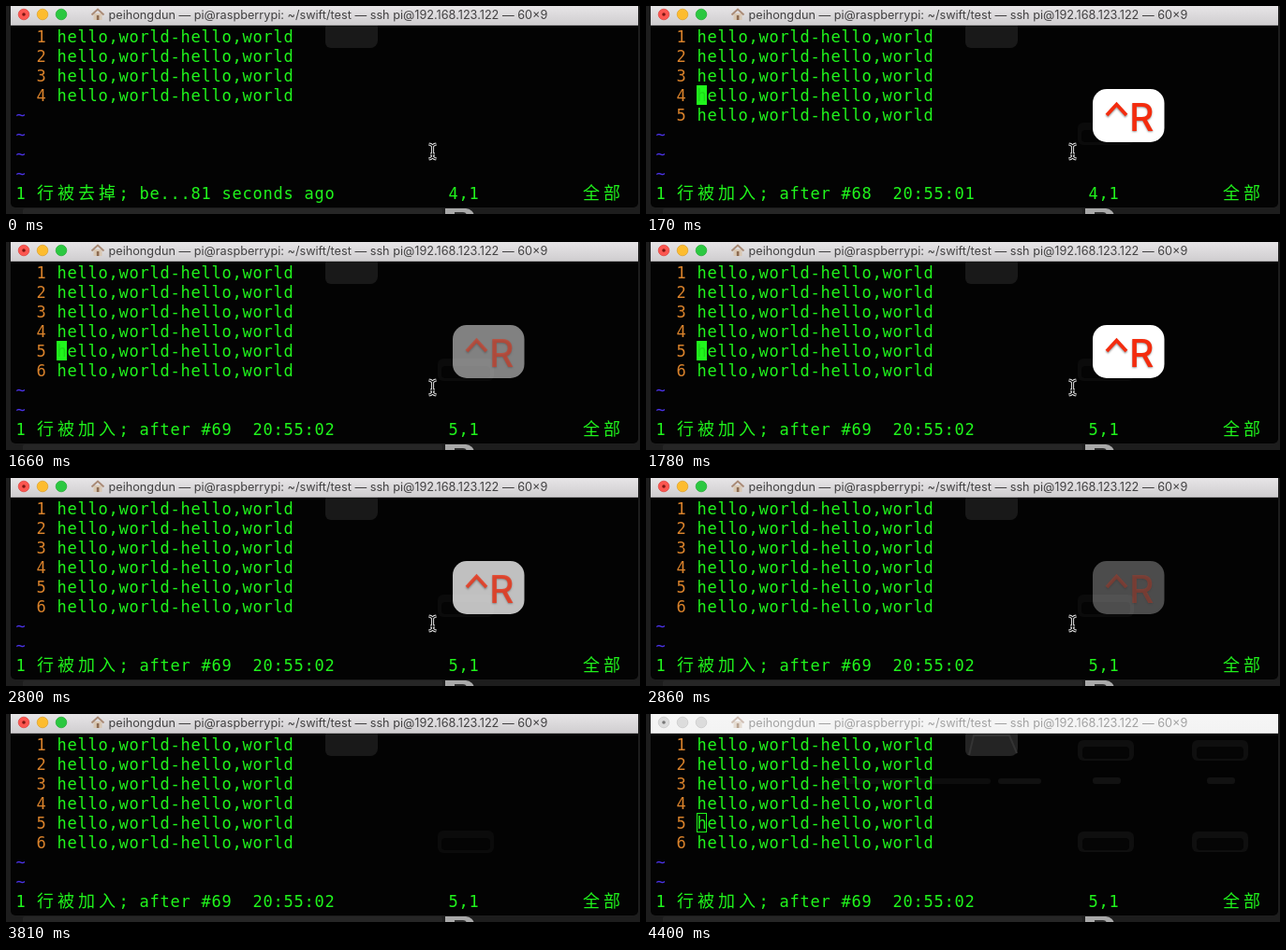
Recreate the animation shown at these times as an HTML page with a canvas. Size 677 by 223 pixels, loop 4.5 s.

```html
<!DOCTYPE html>
<html lang="zh">
<head>
<meta charset="utf-8">
<title>Terminal redo</title>
<style>
html, body { margin: 0; width: 100%; height: 100%; overflow: hidden; background: #1d1d1d; }
canvas { display: block; width: 677px; height: 223px; }
</style>
</head>
<body>
<canvas id="stage" width="677" height="223"></canvas>
<script>
const ctx = document.getElementById('stage').getContext('2d');
const LOOP = 4500;
const CELL = { x: 10, y: 22, w: 11, h: 21 };
const GREEN = '#20f51c', ORANGE = '#d9822b', BLUE = '#4a32e4';
const MONO = '17px "DejaVu Sans Mono", "Noto Sans Mono", monospace';
const CJK = '18px "Noto Sans CJK SC", "Noto Sans CJK", sans-serif';
const TITLE = 'peihongdun — pi@raspberrypi: ~/swift/test — ssh pi@192.168.123.122 — 60×9';

// Step tracks: [start time, value]
const EDITS = [
  [0, { lines: 4, status: '1 行被去掉; be...81 seconds ago', pos: '4,1' }],
  [60, { lines: 5, status: '1 行被加入; after #68  20:55:01', pos: '4,1' }],
  [1660, { lines: 6, status: '1 行被加入; after #69  20:55:02', pos: '5,1' }]
];
const KEY_ALPHA = [[0, 0], [60, .3], [115, .75], [170, 1], [1250, .29], [1310, 0],
  [1660, .5], [1780, 1], [2800, .75], [2860, .29], [2920, 0]];
const CURSOR = [[0, 'off'], [60, 'solid'], [2800, 'off'], [3280, 'solid'], [3810, 'off'], [4290, 'outline']];
const POINTER = [[0, [455.5, 156]], [3450, [497, 161]], [3510, [596, 175]], [3570, null]];

function at(track, t) {
  let value = track[0][1];
  for (const [start, v] of track) if (t >= start) value = v;
  return value;
}

function box(x, y, w, h, r, fill) {
  ctx.beginPath();
  ctx.roundRect(x, y, w, h, r);
  ctx.fillStyle = fill;
  ctx.fill();
}

function disc(x, y, r, fill, edge) {
  ctx.beginPath();
  ctx.arc(x, y, r, 0, Math.PI * 2);
  ctx.fillStyle = fill;
  ctx.fill();
  ctx.strokeStyle = edge;
  ctx.lineWidth = .7;
  ctx.stroke();
}

function path(points, color, width) {
  ctx.beginPath();
  points.forEach(([x, y]) => ctx.lineTo(x, y));
  ctx.strokeStyle = color;
  ctx.lineWidth = width;
  ctx.stroke();
}

// Terminal grid: wide characters take two cells
function print(text, col, row, color) {
  ctx.fillStyle = color;
  for (const ch of text) {
    const wide = ch > '\u2e80';
    ctx.font = wide ? CJK : MONO;
    ctx.fillText(ch, CELL.x + col * CELL.w + (wide ? 1 : .4), CELL.y + row * CELL.h + 17);
    col += wide ? 2 : 1;
  }
}

function drawDesktop() {
  ctx.fillStyle = '#1d1d1d';
  ctx.fillRect(0, 0, 677, 223);
  box(18, 217, 448, 8, 2, '#262626');
  box(469, 217, 31, 14, [0, 9, 0, 0], '#a9a9a9');
  box(479, 221, 13, 8, [0, 4, 0, 0], '#303030');
}

function drawGhosts(idle, t) {
  box(341, 15, 56, 30, [0, 0, 8, 6], idle ? '#242424' : '#191919');
  if (idle) {
    path([[345, 44], [350, 23], [388, 23], [396, 42]], '#343434', 2);
    box(200, 69, 168, 6, 3, '#0d0d0d');
    box(376, 69, 46, 6, 3, '#111');
    for (const x of [461, 583]) {
      for (const y of [28, 126]) {
        box(x, y, 60, 22, 6, '#0f0f0f');
        box(x + 5, y + 7, 50, 13, 4, '#050505');
      }
      box(x + 16, 68, 30, 7, 3, '#121212');
    }
  } else if (t >= 60) {
    box(461, 125, 60, 24, 6, '#0b0b0b');
    box(465, 133, 52, 13, 4, '#040404');
  }
}

function drawTitle(idle) {
  const fade = ctx.createLinearGradient(0, 0, 0, 20);
  fade.addColorStop(0, idle ? '#f6f6f6' : '#e7e5e7');
  fade.addColorStop(1, idle ? '#f3f3f3' : '#d0ced0');
  box(5, -4, 670, 24, 0, fade);
  ctx.fillStyle = idle ? '#cfcfcf' : '#aaa8aa';
  ctx.fillRect(5, 20, 670, 1);

  const lights = [['#fc5650', '#df3e3a'], ['#fdbc2f', '#dda024'], ['#2bc840', '#1eaa2e']];
  lights.forEach(([fill, edge], i) =>
    disc(19 + i * 20, 9, 5.8, idle ? '#dcdcdc' : fill, idle ? '#c8c8c8' : edge));
  disc(19, 9, 1.8, idle ? '#777' : '#7d1712', 'transparent');

  ctx.globalAlpha = idle ? .5 : 1;
  box(93.5, 8, 9, 7, 0, '#d9c8b4');
  box(96.8, 10, 2.6, 5, 0, '#8c6a50');
  path([[91.5, 9.5], [98, 3.5], [104.5, 9.5]], '#a98a76', 1.8);
  ctx.globalAlpha = 1;

  ctx.font = '12.7px Inter, Roboto, sans-serif';
  ctx.fillStyle = idle ? '#a2a2a2' : '#424142';
  ctx.fillText(TITLE, 109.5, 13.5);
}

function drawEditor({ lines, status, pos }, cursor) {
  for (let row = 0; row < 8; row++) {
    if (row < lines) {
      print(String(row + 1), 2, row, ORANGE);
      print('hello,world-hello,world', 4, row, GREEN);
    } else {
      print('~', 0, row, BLUE);
    }
  }
  print(status, 0, 8, GREEN);
  print(pos, 42, 8, GREEN);
  print('全部', 55, 8, GREEN);

  const row = parseInt(pos) - 1;
  const x = CELL.x + 4 * CELL.w, y = CELL.y + row * CELL.h;
  if (cursor === 'solid') {
    box(x, y, CELL.w, CELL.h, 0, GREEN);
    print('h', 4, row, 'rgba(0,60,0,.15)');
  } else if (cursor === 'outline') {
    ctx.strokeStyle = GREEN;
    ctx.lineWidth = 1;
    ctx.strokeRect(x + .5, y + .5, CELL.w - 1, CELL.h - 1);
  }
}

function drawKey(alpha) {
  if (!alpha) return;
  ctx.save();
  ctx.globalAlpha = alpha;
  box(477, 89, 76.5, 57, 15, '#fff');
  ctx.shadowColor = 'rgba(0,0,0,.4)';
  ctx.shadowBlur = 2;
  ctx.shadowOffsetY = 1.5;
  path([[492, 117], [502.5, 105.5], [513, 117]], '#f42c0e', 3.8);
  ctx.font = '500 41px Inter, Roboto, sans-serif';
  ctx.fillStyle = '#f42c0e';
  ctx.fillText('R', 516, 133.5);
  ctx.restore();
}

function drawPointer(spot) {
  if (!spot) return;
  const [x, y] = spot;
  for (const [color, width] of [['#e4e4e4', 3.2], ['#080808', 1.2]]) {
    path([[x, y - 6], [x, y + 6]], color, width);
    for (const s of [-1, 1]) {
      path([[x - 4, y + s * 8], [x - 2, y + s * 7.5], [x, y + s * 6],
        [x + 2, y + s * 7.5], [x + 4, y + s * 8]], color, width);
    }
    path([[x - 2.5, y + 3], [x + 2.5, y + 3]], color, width);
  }
}

function draw(t) {
  const idle = t >= 4290;
  drawDesktop();
  box(5, 20, 670, 196, [0, 0, 5, 5], '#030303');
  drawGhosts(idle, t);
  drawTitle(idle);
  drawEditor(at(EDITS, t), at(CURSOR, t));
  drawKey(at(KEY_ALPHA, t));
  drawPointer(at(POINTER, t));
}

const start = performance.now();
function frame() {
  draw((performance.now() - start) % LOOP);
  requestAnimationFrame(frame);
}
frame();
</script>
</body>
</html>
```
